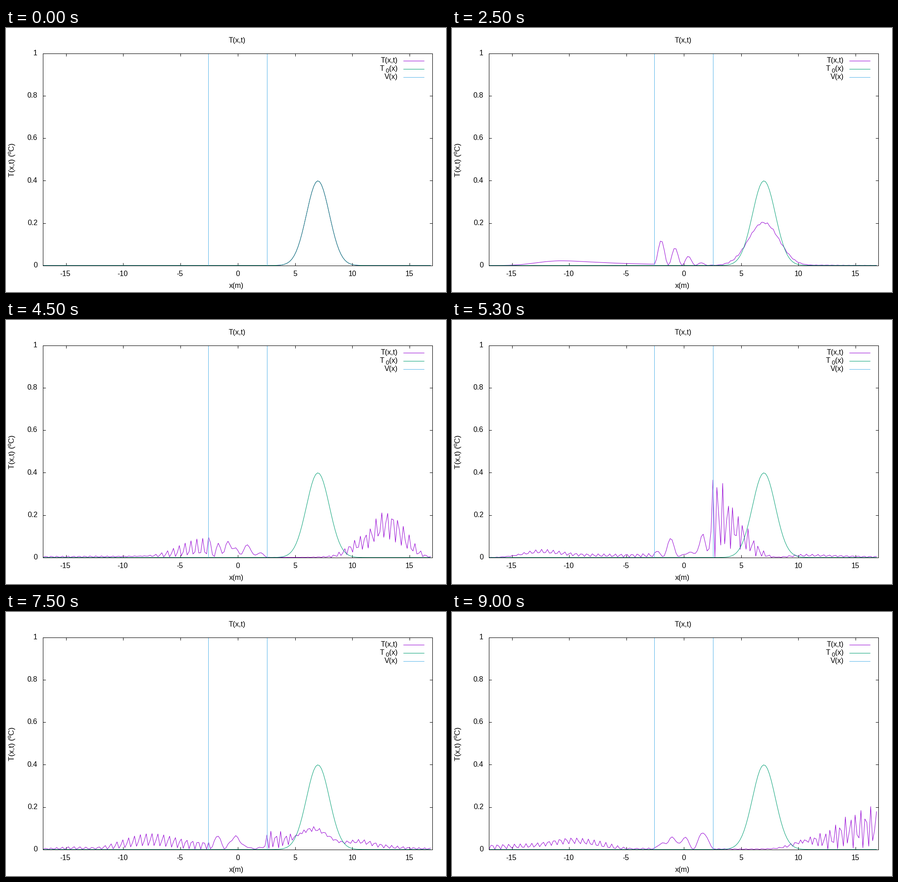
Animation, 966 px wide and 580 px high, one loop 9.1 s. Source, as a matplotlib script:

```python
import numpy as np
import matplotlib.pyplot as plt
from matplotlib.animation import FuncAnimation

W, H, DPI = 966, 580, 100
FRAMES, INTERVAL = 91, 100
PX = 72 / DPI
PURPLE, GREEN, BLUE = "#9400d3", "#009e73", "#56b4e9"

# Wave packet between hard walls at x = -17 and 17, with a barrier in the middle
L = 34
EDGE = 2.56               # half width of the barrier
K0 = 11.9                 # packet momentum, to the left
V0 = 11.85 ** 2           # barrier height, in units of k^2
STEPS, HALF_DT = 7, 1 / 160   # Crank-Nicolson steps per frame, half a step
MODES = 300

x = -17 + 0.17 * np.arange(200)


def density(pos):
    return np.exp(-(pos - 7) ** 2 / 2) / np.sqrt(2 * np.pi)


def sines(pos):
    """Orthonormal box modes, one column per mode."""
    return np.sqrt(2 / L) * np.sin(np.outer(pos + L / 2, k))


def overlap(q):
    """Integral of cos(q (x + L/2)) over the barrier, divided by L."""
    return 2 * EDGE / L * np.cos(q * L / 2) * np.sinc(q * EDGE / np.pi)


def evolve():
    """|psi|^2 at the plotted points, one row per frame."""
    ham = np.diag(k ** 2) + V0 * (overlap(k[:, None] - k) - overlap(k[:, None] + k))
    energy, states = np.linalg.eigh(ham)
    fine = np.linspace(-L / 2, L / 2, 3001)
    start = np.sqrt(density(fine)) * np.exp(-1j * K0 * fine)
    coef = states.T @ (sines(fine).T @ start) * (fine[1] - fine[0])
    # Each Crank-Nicolson step turns a state by 2 atan(E dt / 2)
    angle = 2 * STEPS * np.arctan(HALF_DT * energy)
    turn = np.exp(-1j * np.outer(angle, np.arange(FRAMES)))
    psi = sines(x) @ states @ (coef[:, None] * turn)
    return np.abs(psi.T) ** 2


k = np.pi / L * np.arange(1, MODES + 1)
rho = evolve()

# Chart
plt.rcParams["font.family"] = "Liberation Sans"
fig = plt.figure(figsize=(W / DPI, H / DPI), dpi=DPI, facecolor="white")
LEFT, BOTTOM, WIDTH, HEIGHT = 81.3, 521.7, 855, 466
ax = fig.add_axes([LEFT / W, 1 - BOTTOM / H, WIDTH / W, HEIGHT / H])
ax.set(xlim=(-17, 17), ylim=(0, 1),
       xticks=range(-15, 16, 5), yticks=np.arange(6) / 5)
ax.tick_params(direction="in", top=True, right=True, length=6 * PX, width=PX,
               labelbottom=False, labelleft=False)
for spine in ax.spines.values():
    spine.set_linewidth(PX)


def label(px, py, s, ha="center", size=16, **kw):
    kw.setdefault("va", "baseline")
    fig.text(px / W, 1 - py / H, s, ha=ha, fontsize=size * PX, **kw)


for t in range(-15, 16, 5):
    label(LEFT + (t + 17) * WIDTH / L - (1.5 if t < 0 else 0), 545, str(t))
for n in range(6):
    label(69, 526 - n * HEIGHT / 5, f"{n / 5:g}", "right")
label(507, 32, "T(x,t)")
label(506, 571, "x(m)")
label(13, 290, "T(x,t) (ºC)", size=17, rotation=90, va="center")

label(860, 76, "T(x,t)", "right")
label(821, 94, "T", "left")
label(833, 98, "0", "left", 13)
label(860, 94, "(x)", "right")
label(860, 112, "V(x)", "right")
for n, color in enumerate((PURPLE, GREEN, BLUE)):
    y = 1 - (71.7 + 18 * n) / H
    fig.add_artist(plt.Line2D([872 / W, 918 / W], [y, y], color=color, lw=PX,
                              solid_capstyle="butt"))

curve, = ax.plot(x, rho[0], color=PURPLE, lw=PX)
ax.plot(x, density(x), color=GREEN, lw=PX)
for edge in (-EDGE, EDGE):
    ax.axvline(edge, color=BLUE, lw=PX)


def update(n):
    curve.set_ydata(rho[n])
    return curve,


anim = FuncAnimation(fig, update, frames=FRAMES, interval=INTERVAL,
                     repeat=True, repeat_delay=0)
plt.show()
```
